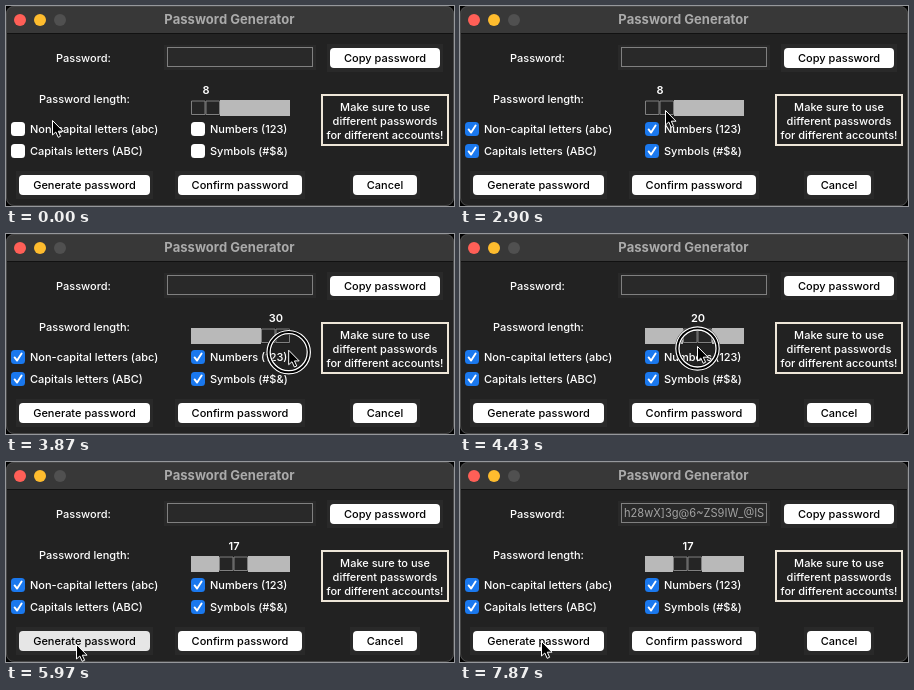
Recreate the animation shown at these times as an HTML page. Size 448x200 px, loop 8 s.

```html
<!DOCTYPE html>
<html lang="en">
<head>
<meta charset="utf-8">
<title>Password Generator</title>
<style>
html, body { margin: 0; width: 100%; height: 100%; overflow: hidden; background: #000; }
svg { display: block; width: 448px; height: 200px; }
text { font: 500 11px Inter, "Open Sans", sans-serif; fill: #fff; }
.mid { text-anchor: middle; }
.dark { fill: #000; }
.title { font-size: 13px; font-weight: 700; fill: #aaa; letter-spacing: .05px; }
.entry { font-size: 11.1px; font-weight: 400; fill: #a2a2a2; }
.edge { fill: #292929; }
#count { font-weight: 600; }
</style>
</head>
<body>
<svg viewBox="0 0 448 200">
  <clipPath id="win"><rect width="448" height="200" rx="8"/></clipPath>
  <clipPath id="field"><rect x="162" y="42" width="144" height="18"/></clipPath>
  <g clip-path="url(#win)">
    <rect width="448" height="200" fill="#222"/>
    <rect width="448" height="28" fill="#383838"/>
    <rect y="27" width="448" height="1" fill="#111"/>
  </g>
  <rect x=".5" y=".5" width="447" height="199" rx="7.5" fill="none" stroke="#484848"/>
  <circle cx="14" cy="14" r="6" fill="#ff5f57"/>
  <circle cx="34" cy="14" r="6" fill="#febc2e"/>
  <circle cx="54" cy="14" r="6" fill="#505050"/>
  <text class="title mid" x="223.5" y="18">Password Generator</text>

  <rect class="edge" x="158" y="39" width="152" height="25"/>
  <rect class="edge" x="161.5" y="41.5" width="145" height="19" stroke="#808080"/>
  <text id="pass" class="entry" x="164" y="55" clip-path="url(#field)"></text>

  <rect x="185" y="94" width="99" height="16" fill="#b9b9b9"/>
  <g id="thumb">
    <rect y="94" width="29" height="16" fill="#1c1c1c"/>
    <path d="M.5 95h13.5v13.5H.5zM15 95h13.5v13.5H15z" fill="#252525" stroke="#808080"/>
    <text id="count" class="mid" x="15" y="88"></text>
  </g>

  <rect x="316" y="89" width="126" height="50" fill="none" stroke="#eee6d8" stroke-width="2"/>
  <text class="mid" x="379" y="105">Make sure to use</text>
  <text class="mid" x="379" y="119">different passwords</text>
  <text class="mid" x="379" y="133">for different accounts!</text>

  <g id="parts"></g>
  <g id="cursor">
    <g id="ring" fill="none">
      <circle cx=".5" cy="2.5" r="20" stroke="#000" stroke-width="5"/>
      <circle cx=".5" cy="2.5" r="18.5" stroke="#fff" stroke-width="1.3"/>
      <circle cx=".5" cy="2.5" r="21.7" stroke="#fff" stroke-width="1.2"/>
    </g>
    <path d="M.5 .5V15L3.8 12 6.2 17.3 8.6 16.3 6.3 11.2H11Z" fill="#000" stroke="#fff" stroke-linejoin="round"/>
  </g>
</svg>
<script>
const LOOP = 8000, GLIDE = 430;
const PRESS = 5870, FIRST = 6030, PRESS_AGAIN = 7800, SECOND = 7865;
const byId = id => document.getElementById(id);
const show = (el, on) => el.setAttribute('visibility', on ? 'visible' : 'hidden');
const within = (t, a, b) => t >= a && t < b;

function add(tag, attrs, text = '') {
  const el = document.createElementNS('http://www.w3.org/2000/svg', tag);
  for (const key in attrs) el.setAttribute(key, attrs[key]);
  el.textContent = text;
  byId('parts').append(el);
  return el;
}

function button(label, x, y, width) {
  add('rect', { x: x - 3, y: y - 4, width: width + 6, height: 28, class: 'edge' });
  const face = add('rect', { x, y, width, height: 20, rx: 4, fill: '#fff' });
  add('text', { x: x + width / 2, y: y + 14, class: 'mid dark' }, label);
  return face;
}

function check(label, x, y, at) {
  const box = add('rect', { x: x - 7, y: y - 7, width: 14, height: 14, rx: 3.5 });
  const tick = add('path', {
    d: `M${x - 3.4} ${y + .4}l2.5 3.2 4.5-7`, fill: 'none', stroke: '#fff',
    'stroke-width': 1.9, 'stroke-linecap': 'round', 'stroke-linejoin': 'round'
  });
  add('text', { x: x + 12, y: y + 4 }, label);
  return t => {
    box.setAttribute('fill', t >= at ? '#1a78ee' : '#fff');
    show(tick, t >= at);
  };
}

add('text', { x: 50, y: 56 }, 'Password:');
add('text', { x: 33, y: 97 }, 'Password length:');
button('Copy password', 324, 42, 110);
const generate = button('Generate password', 13, 169, 131);
button('Confirm password', 172, 169, 124);
button('Cancel', 347, 169, 64);

const checks = [
  check('Non-capital letters (abc)', 12, 123, 330),
  check('Capitals letters (ABC)', 12, 145, 950),
  check('Symbols (#$&)', 192, 145, 1670),
  check('Numbers (123)', 192, 123, 2170)
];

// where the pointer rests: arrival time, x, y
const stops = [
  [0, 46, 114],
  [250, 13, 125], [900, 14, 146], [1530, 212, 144], [2130, 199, 122],
  [2900, 205, 104], [3470, 165, 105], [3740, 304, 117], [4030, 253, 114],
  [4430, 237, 112], [4800, 229, 114],
  [5670, 70, 182], [7250, 60, 183], [7770, 81, 179]
];

const ease = u => u * u * (3 - 2 * u);

// rest at a stop, then glide to the next so as to arrive on time
function pointer(t) {
  const next = stops.findIndex(s => s[0] > t);
  if (next < 0) return stops.at(-1).slice(1);
  const [from, x0, y0] = stops[next - 1], [to, x1, y1] = stops[next];
  const span = Math.min(GLIDE, to - from);
  const u = ease(Math.max(0, 1 - (to - t) / span));
  return [x0 + (x1 - x0) * u, y0 + (y1 - y0) * u];
}

function sliderValue(t) {
  if (t < 3470) return 8;
  const [x] = pointer(Math.min(t, 4800));
  return Math.max(8, Math.min(30, Math.round(8 + (x - 200) / 3.16)));
}

function draw(t) {
  const [x, y] = pointer(t);
  byId('cursor').setAttribute('transform', `translate(${x.toFixed(2)} ${y.toFixed(2)})`);
  show(byId('ring'), within(t, 3100, 5000));
  checks.forEach(set => set(t));

  const value = sliderValue(t);
  byId('count').textContent = value;
  byId('thumb').setAttribute('transform', `translate(${Math.round(185 + (value - 8) * 3.16)} 0)`);

  const pressed = within(t, PRESS, FIRST) || within(t, PRESS_AGAIN, SECOND);
  generate.setAttribute('fill', pressed ? '#e6e6e6' : '#fff');
  byId('pass').textContent = t < FIRST ? '' : t < SECOND ? 'Kp4#vT9s&Qz2m!Xw7e' : 'h28wX]3g@6~ZS9IW_@IS';
}

const start = performance.now();
function tick() {
  draw((performance.now() - start) % LOOP);
  requestAnimationFrame(tick);
}
tick();
</script>
</body>
</html>
```
